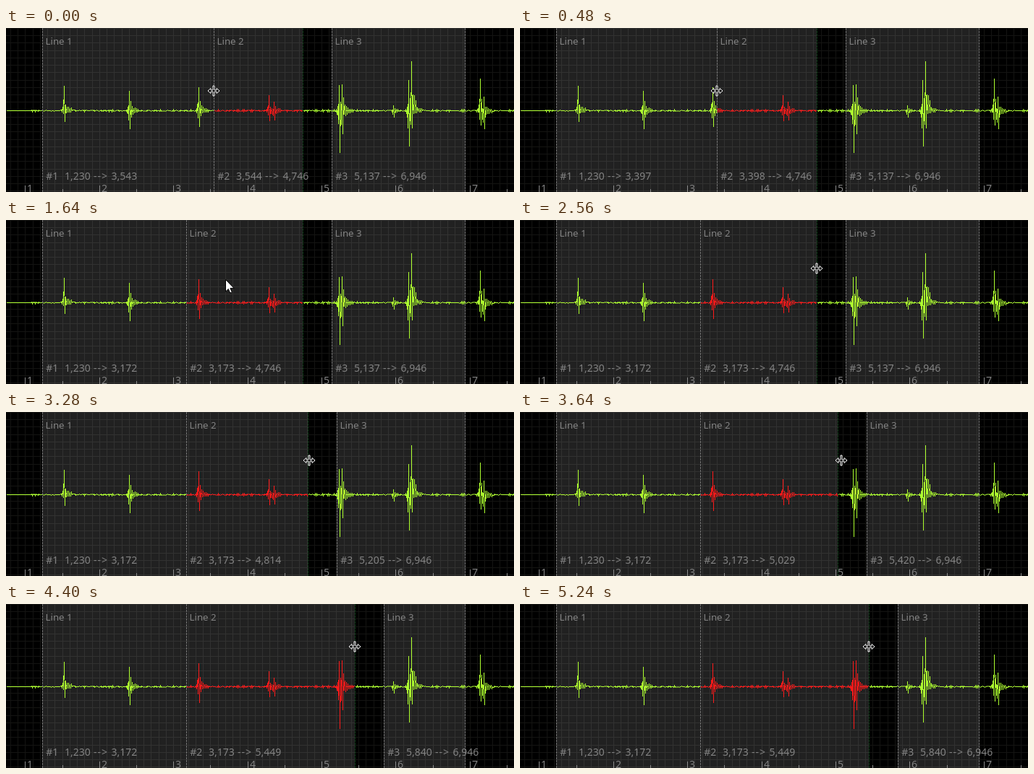
Write an HTML page that moves like this. It is 702 px wide and 227 px high and loops after 6240 ms.

```html
<!DOCTYPE html>
<html lang="en">
<head>
<meta charset="utf-8">
<title>Waveform line timing</title>
<style>
  html, body { margin: 0; width: 100%; height: 100%; overflow: hidden; background: #000; }
  svg { display: block; width: 702px; height: 227px; }
  text { font: 14px "Noto Sans", "Open Sans", sans-serif; fill: #828282; white-space: pre; }
  .title { font-size: 13.3px; }
  .times { word-spacing: .7px; }
  .arrow { letter-spacing: 1px; }
  .crisp { shape-rendering: crispEdges; fill: none; }
</style>
</head>
<body>
<svg viewBox="0 0 702 227">
  <defs><clipPath id="selection"><rect id="selectionBox" height="227"/></clipPath></defs>
  <rect width="702" height="227"/>
  <path id="grid" class="crisp" stroke="#141412"/>
  <g id="shades" fill="#fff" fill-opacity=".13" shape-rendering="crispEdges"></g>
  <path id="ticks" class="crisp" stroke="#8c8c8c"/>
  <g id="axis"></g>
  <path id="wave" class="crisp" stroke="#adff2f"/>
  <g clip-path="url(#selection)">
    <path id="selectedWave" class="crisp" stroke="#ff1a1a"/>
  </g>
  <g id="edges" class="crisp" stroke-dasharray="3 1"></g>
  <g id="labels"></g>
  <path id="resize" d="M-8 0L-4-3.5V-1H-1V-7H1V-1H4V-3.5L8 0L4 3.5V1H1V7H-1V1H-4V3.5Z" fill="#000" stroke="#fff"/>
  <path id="pointer" d="M.5.5V17L4.3 13.4L6.7 19L9.3 17.9L6.9 12.4H12Z" fill="#fff" stroke="#000"/>
</svg>
<script>
const LOOP = 6240, STEP = 40, WIDTH = 702, HEIGHT = 227, MID = 114.5;
const PX_PER_SEC = 102.4, MS_PER_PX = 1000 / PX_PER_SEC, GRID = PX_PER_SEC / 10;
const FIRST_TICK = 26.4, SPLIT = 287, END = 410, GAP = 40;
const SPLIT_DROPPED = 1280, END_GRABBED = 3040, DRAG_LAG = 65;
const $ = id => document.getElementById(id);

function set(node, attrs) {
  for (const key in attrs) node.setAttribute(key, attrs[key]);
}

function add(parent, tag, attrs = {}, text = '') {
  const node = document.createElementNS('http://www.w3.org/2000/svg', tag);
  set(node, attrs);
  node.textContent = text;
  return parent.appendChild(node);
}

// Mouse stops: time, x, y. Both drags follow the mouse.
const mouseStops = [
  [40, 287, 87], [920, 256, 87], [1280, 249, 87], [1480, 249, 87], [1640, 303, 82],
  [2120, 377, 71], [2560, 410, 67], [3040, 410, 67], [3400, 424, 67], [3640, 444, 67],
  [4000, 471, 63], [4280, 482, 59]
];

function mouseAt(time) {
  const last = mouseStops[mouseStops.length - 1];
  const t = Math.min(Math.max(time, mouseStops[0][0]), last[0]);
  const next = Math.max(1, mouseStops.findIndex(stop => stop[0] >= t));
  const [t0, x0, y0] = mouseStops[next - 1], [t1, x1, y1] = mouseStops[next];
  const p = (t - t0) / (t1 - t0);
  return { x: Math.round(x0 + (x1 - x0) * p), y: Math.round(y0 + (y1 - y0) * p) };
}

// Sound hits: x, height above and depth below the middle
const hits = [
  [80, 34, 15], [170, 27, 25], [266, 32, 22], [363, 21, 14], [370, 12, 13], [460, 35, 58],
  [464, 36, 32], [535, 7, 9], [556, 42, 49], [560, 68, 24], [655, 44, 20], [660, 19, 25]
];

function noise(n) {
  const v = Math.sin(n * 12.9898) * 43758.5453;
  return v - Math.floor(v);
}

// A hit swells quickly, rings on every other pixel and dies away.
function ring([hitX, up, down], x) {
  const d = x - hitX;
  const size = d % 2 ? -down : up;
  if (d === 0 || d === 1) return size;
  const envelope = d < 0 ? Math.exp((d + 1) / 1.2) : Math.exp((1 - d) / 4.5);
  return size * envelope * (.25 + .4 * noise(x));
}

function deflection(x) {
  if (x < 32) return 0;
  const hum = (x % 2 ? 1 : -1) * noise(x) * .9;
  const values = hits.map(hit => ring(hit, x));
  return Math.round(values.reduce((a, b) => Math.abs(b) > Math.abs(a) ? b : a, hum));
}

function buildStatic() {
  let grid = '', ticks = '', wave = '';
  for (let x = FIRST_TICK % GRID; x < WIDTH; x += GRID) grid += `M${Math.round(x) + .5} 0V${HEIGHT}`;
  for (let y = 0; y < HEIGHT; y += GRID) grid += `M0 ${Math.round(y) + .5}H${WIDTH}`;
  for (let second = 1; second < 8; second++) {
    const x = FIRST_TICK + (second - 1) * PX_PER_SEC;
    ticks += `M${Math.round(x) + .5} 218V227M${Math.round(x + PX_PER_SEC / 2) + .5} 223V227`;
    add($('axis'), 'text', { x: Math.round(x) + 3, y: 227 }, second);
  }
  for (let x = 0; x < WIDTH; x++) wave += `${x ? 'L' : 'M'}${x + .5} ${MID - deflection(x)}`;
  set($('grid'), { d: grid });
  set($('ticks'), { d: ticks });
  set($('wave'), { d: wave });
  set($('selectedWave'), { d: wave });
}

const lines = [1, 2, 3].map(number => {
  const title = add($('labels'), 'text', { class: 'title', y: 23 }, `Line ${number}`);
  const times = add($('labels'), 'text', { class: 'times', y: 210 });
  const from = add(times, 'tspan');
  add(times, 'tspan', { class: 'arrow' }, '-->');
  const to = add(times, 'tspan');
  return { number, title, times, from, to, shade: add($('shades'), 'rect', { height: HEIGHT }) };
});
const edges = [0, 1, 2, 3].map(() => add($('edges'), 'path', { stroke: '#747474' }));
const endEdge = add($('edges'), 'path', { stroke: '#0d3a16' });

const clock = ms => `${Math.floor(ms / 1000)},${String(ms % 1000).padStart(3, '0')}`;
const shift = (ms, px) => ms + Math.trunc(px * MS_PER_PX);
const placeEdge = (edge, x) => set(edge, { d: `M${x + .5} 0V${HEIGHT}` });

function placeLine(line, x, end, fromMs, toMs) {
  set(line.shade, { x, width: end - x });
  set(line.title, { x: x + 4.5 });
  set(line.times, { x: x + 5.2 });
  line.from.textContent = `#${line.number}  ${clock(fromMs)} `;
  line.to.textContent = ` ${clock(toMs)}`;
}

function render(time) {
  const t = Math.floor(time % LOOP / STEP) * STEP;
  const split = mouseAt(Math.min(t, SPLIT_DROPPED)).x;
  const end = mouseAt(Math.max(t - DRAG_LAG, END_GRABBED)).x;
  const third = end + GAP, moved = end - END;
  const splitMs = shift(3543, split - SPLIT);

  placeLine(lines[0], 50, split, 1230, splitMs);
  placeLine(lines[1], split, end, splitMs + 1, shift(4746, moved));
  placeLine(lines[2], third, 635, shift(5137, moved), 6946);
  [50, split, third, 634].forEach((x, i) => placeEdge(edges[i], x));
  placeEdge(endEdge, end);
  set($('selectionBox'), { x: split, width: end - split + 1 });

  const { x, y } = mouseAt(t);
  const free = t >= 1520 && x > split && x < END - 5;
  const transform = `translate(${x} ${y})`;
  set($('pointer'), { transform, visibility: free ? 'visible' : 'hidden' });
  set($('resize'), { transform, visibility: free ? 'hidden' : 'visible' });
}

buildStatic();
const start = performance.now();
function tick() {
  render(performance.now() - start);
  requestAnimationFrame(tick);
}
tick();
</script>
</body>
</html>
```
